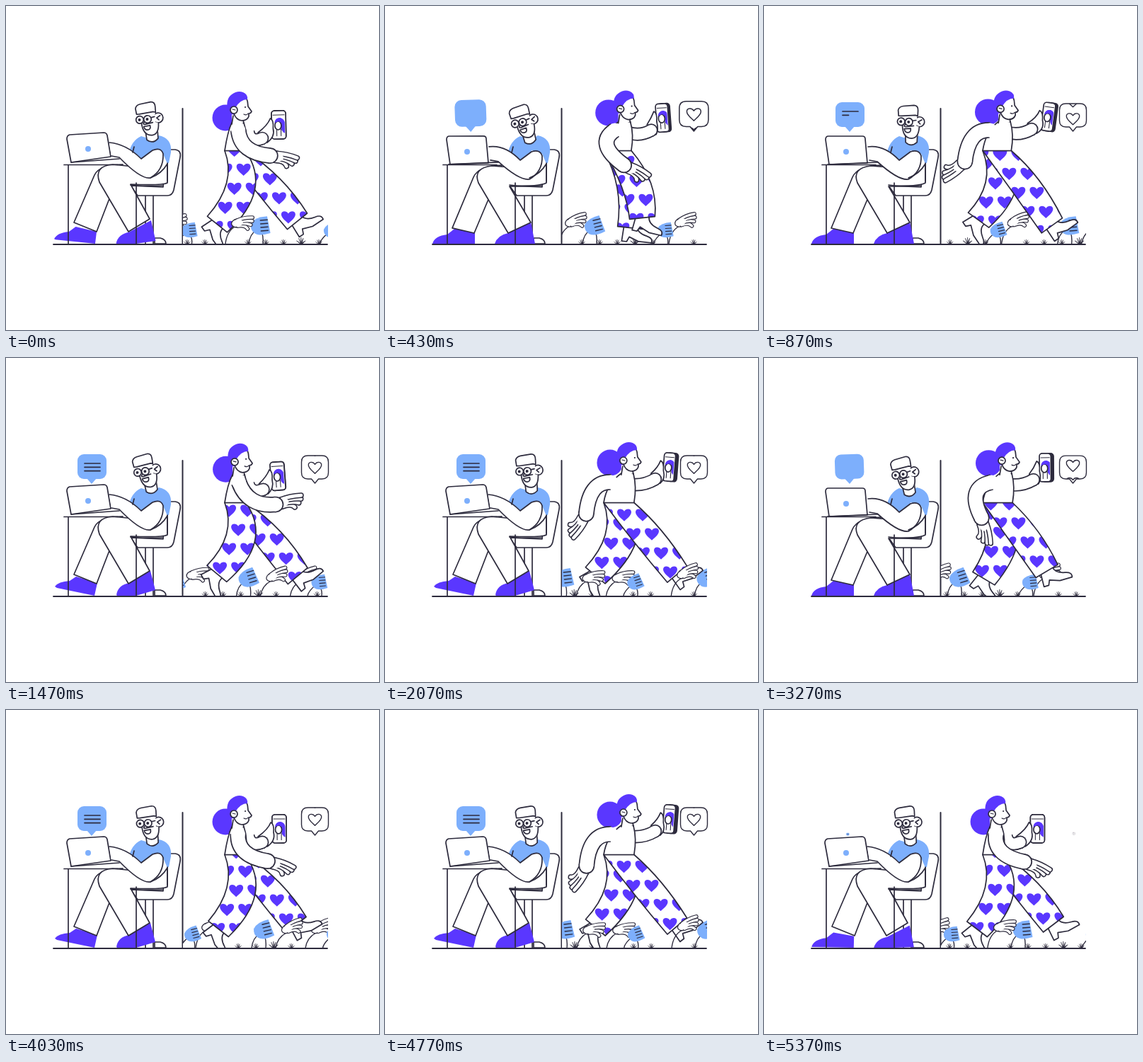
Write an HTML page with a canvas that moves like this. It is 527 px wide and 458 px high and loops after 5410 ms.

```html
<!DOCTYPE html>
<html lang="en">
<head>
<meta charset="utf-8">
<title>Desk and walk</title>
<style>
html, body { margin: 0; width: 100%; height: 100%; overflow: hidden; background: #fff; }
canvas { display: block; }
</style>
</head>
<body>
<canvas id="stage" width="527" height="458"></canvas>
<script>
const g = document.getElementById('stage').getContext('2d');
const INK = '#2d2b3d', PURPLE = '#5a37ff', BLUE = '#7daffc', WHITE = '#fff';
const LOOP = 5410, SCENE = LOOP / 2, WALK = LOOP / 4;
const LINE = 1.7, FLOOR = 337, TILE = 402, WAIST = 204.5;
const rad = d => d * Math.PI / 180;
const lerp = (a, b, k) => a + (b - a) * k;
const clamp = x => Math.max(0, Math.min(1, x));
const ramp = (t, a, b) => { const k = clamp((t - a) / (b - a)); return k * k * (3 - 2 * k); };
// One swing per step cycle; lag is where it peaks
const wave = (u, lag = 0) => Math.cos(2 * Math.PI * (u - lag));

function draw(path, fill, stroke = INK, width = LINE) {
  const p = typeof path === 'string' ? new Path2D(path) : path;
  if (fill) { g.fillStyle = fill; g.fill(p); }
  if (stroke) { g.strokeStyle = stroke; g.lineWidth = width; g.stroke(p); }
}
function disc(x, y, rx, fill, stroke, ry = rx) {
  const p = new Path2D();
  p.ellipse(x, y, rx, ry, 0, 0, 7);
  draw(p, fill, stroke);
}
function box(x, y, w, h, r, fill, stroke) {
  const p = new Path2D();
  p.roundRect(x, y, w, h, r);
  draw(p, fill, stroke);
}
function local(x, y, deg, scale, fn) {
  g.save();
  g.translate(x, y);
  g.rotate(rad(deg));
  g.scale(scale, scale);
  fn();
  g.restore();
}
function mixPath(a, b, k) {
  const end = b.match(/-?[\d.]+/g);
  let i = 0;
  return a.replace(/-?[\d.]+/g, v => lerp(+v, +end[i++], k).toFixed(2));
}

// Sleeve: open at the start, rounded at the end
function tube(sx, sy, cx, cy, ex, ey, w) {
  const p = new Path2D(`M${sx},${sy}Q${cx},${cy} ${ex},${ey}`);
  g.lineCap = 'butt';
  for (const [color, d] of [[INK, LINE], [WHITE, -LINE]]) {
    disc(ex, ey, (w + d) / 2, color, null);
    draw(p, null, color, w + d);
  }
  g.lineCap = 'round';
  disc(sx, sy, w / 2 - .5, WHITE, null);
}
function hand(spread = 1) {
  disc(9, 0, 12, WHITE, INK, 8);
  for (let i = 3; i >= 0; i--) {
    const y = i * 3.5 - 5;
    const p = `M8,${y}Q22,${y * spread - 2} ${38 - i * i * 1.4},${(i * 4.8 - 4) * spread}`;
    draw(p, null, INK, 7.6);
    draw(p, null, WHITE, 4.6);
  }
  disc(9, 0, 10, WHITE, null, 6.5);
}
const HEART = 'M0,9C-4,5 -10,1 -10,-4C-10,-9 -3,-10 0,-5C3,-10 10,-9 10,-4C10,1 4,5 0,9Z';

// ---------- left room ----------
function manHead(x, y, turn) {
  local(x, y, turn, 1, () => {
    draw('M-5,18L-4,29Q4,36 12,28L12,10Z', WHITE);
    disc(14, -1, 7, WHITE, INK);
    draw('M17,-4L12,-1L15,2', null);
    draw('M-12,-9L-10,8Q-7,22 4,24Q15,23 14,6L10,5L10,-11Z', WHITE, null);
    draw('M-10,4Q-9,23 4,23Q14,22 14,6', null);
    draw('M-16,-8L-17,-16Q-16,-21 -10,-22L5,-24Q11,-24 11,-17L11,-9L8,-10L-12,-8Z', WHITE);
    for (const cx of [-12, -1]) {
      disc(cx, 0, 5.3, WHITE, INK);
      disc(cx - .5, 0, 2, INK, null);
    }
    draw('M4,-2L9,-3M-6,4Q-9,7 -5,7L6,5', null);
    draw('M-7,10L2,9Q3,15 -2,15Q-6,15 -7,10Z', WHITE);
  });
}

function man(t) {
  const lean = ramp(t, 100, 450) - ramp(t, 950, 1250);
  const sinceTap = Math.abs(t + 65 - SCENE * Math.round((t + 65) / SCENE));
  const tap = sinceTap < 130 ? Math.cos(Math.PI * sinceTap / 260) ** 2 : 0;
  const foot = Math.max(lean, tap);
  // chair
  draw('M197,268V337M208,268V337', null);
  draw('M210,336V328H218Q226,330 226,336Z', WHITE);
  draw('M226,203H239Q248,204 246,214L237,260Q235,268 228,268H186L176,254L222,256Z', WHITE);
  // rear leg and shoe
  draw(mixPath('M69,323Q74,316 90,315L99,309L129,318L125,336L72,325Z',
    'M67,336Q70,325 88,323L98,315L127,320L127,336L68,336Z', foot), PURPLE, null);
  draw(mixPath('M165,224Q132,224 125,239L96,306L128,319L150,262Z',
    'M165,225Q132,226 125,242L95,314L126,321L150,264Z', lean), WHITE);
  // front shoe and leg
  draw(mixPath('M156,335Q158,321 174,318L204,301L211,328L184,336L157,336Z',
    'M155,336Q159,324 174,321L206,305L212,336L184,336L156,336Z', foot), PURPLE, null);
  draw(mixPath('M228,222V250Q220,254 176,252L203,301L173,319L132,249Q124,226 151,224L190,228Z',
    'M228,223V250Q220,255 176,255L206,306L174,321L132,250Q124,229 151,226L190,229Z', lean), WHITE);
  draw('M176,253Q188,255 221,254', null);
  // shirt
  draw('M173,210Q177,190 191,184Q206,190 216,183Q235,187 233,207L230,222L188,226Z', BLUE, null);
  const u = t / WALK;
  manHead(201 - 6 * wave(u, .25), 160 + 4 * lean, -4 - 9 * wave(u, .25));
  // laptop
  draw(mixPath('M90,182L138,179Q142,179 143,183L148,213L92,221L86,188Q86,183 90,182Z',
    'M91,184L139,184Q143,184 143,188L146,222L92,224L87,189Q87,184 91,184Z', lean), WHITE);
  disc(116, lerp(202, 206, lean), 4, BLUE, null);
  draw(mixPath('M92,221L160,216', 'M90,224L160,221', lean), null);
  // arm
  const arm = mixPath('M146,193Q170,195 191,216L207,204Q219,199 222,209Q223,232 204,243Q190,245 160,214L149,212',
    'M147,199Q170,196 191,218L207,206Q219,202 222,212Q223,234 204,245Q190,247 160,220L149,218', lean);
  draw('M207,204L222,209L228,223Q216,243 202,243Z', WHITE, null);
  draw(arm, WHITE);
  draw('M181,199L179,207M228,222V248M228,223Q220,237 204,243', null);
  // desk
  draw('M82,224.5H158M88,225V337M184,250V337', null);
  draw('M249.5,145V337', null, INK, 2);
}

// ---------- speech bubbles ----------
function bubbleScale(t) {
  if (t > 2300) return 1 - .9 * ramp(t, 2430, 2665) - .1 * ramp(t, 2666, 2690);
  const k = clamp((t - 330) / 330);
  return k ? 1 - Math.exp(-5 * k) * Math.cos(7 * k) * (1 - k) : 0;
}
function bubbles(t) {
  const s = bubbleScale(t);
  if (s < .005) return;
  const tilt = -2 * (1 - ramp(t, 560, 700));
  local(lerp(118, 121, s), 178, tilt, s, () => {
    box(-20, -42, 41, 35, 9, BLUE, null);
    draw('M-7,-8L0,0L7,-8Z', BLUE, null);
    for (let i = 0; i < 3; i++) {
      const k = ramp(t, 720 + i * 100, 840 + i * 100);
      if (k) draw(`M-10,${-29 + i * 5.3}h${22 * k}`, null);
    }
  });
  local(lerp(438, 436.5, s), 177, 0, s, () => {
    const shape = new Path2D('M-10,-39H10Q19,-39 19,-30V-15Q19,-6 10,-6H5L0,0L-5,-6H-10Q-19,-6 -19,-15V-30Q-19,-39 -10,-39Z');
    draw(shape, WHITE, INK, 1.4);
    g.clip(shape);
    const rise = 25 * ramp(t, 440, 1030);
    for (const y of [-22, 3]) local(0, y - rise, 0, .92, () => draw(HEART, null, INK, 1.5));
  });
}

// ---------- plants ----------
function scrolled(x, shift, fn) {
  const px = ((x - shift - 200) % TILE + TILE) % TILE + 200;
  if (px < 490) fn(px);
}
function blueLeaves(shift, u) {
  for (let i = 0; i < 4; i++) scrolled(360 + i * TILE / 4, shift, x => {
    const small = i % 2, y = 311 + 6 * small;
    draw(`M${x - 17},${FLOOR}Q${x - 16},${y + 12} ${x - 4},${y + 3}Q${x + 5},${y + 8} ${x + 3},${FLOOR}`, WHITE, INK, 1.4);
    local(x, y, -11 + 7 * wave(u, i / 3), 1 - .18 * small, () => {
      draw('M10,-13L13,11Q-3,15 -10,9Q-16,3 -13,-5Q-7,-13 10,-13Z', BLUE, null);
      for (let k = 0; k < 4; k++) draw(`M0,${-8 + k * 5}h10`, null, INK, 1.4);
    });
  });
}
function handLeaves(spots, shift, u) {
  spots.forEach((spot, i) => scrolled(spot, shift, x => {
    const y = 306 + 4 * i;
    draw(`M${x - 20},${FLOOR}Q${x - 18},${y + 12} ${x - 5},${y + 5}`, null, INK, 1.4);
    local(x - 9, y + 2, -18 + 8 * wave(u, i / 2), .75, () => hand(1.35));
  }));
}
function grass(shift) {
  // tufts stand in groups of five
  for (let i = 0; i < 12; i++) scrolled(342 + 25 * i + 33 * Math.floor(i / 5), shift, x =>
    local(x, FLOOR, 0, i % 5 === 3 ? 1 : .72, () => {
      for (let k = -2; k <= 2; k++) {
        const dx = k * 3.2, h = 10 - k * k * 1.2;
        draw(`M-1,0Q${dx * .3},${-h * .6} ${dx},${-h}Q${dx * .6},${-h * .4} 1,0`, INK, INK, .5);
      }
    }));
}

// ---------- walker ----------
function leg(phase, right) {
  const u = phase % 1, c = wave(u, .55);
  const reach = c * (1.25 - .25 * c * c);
  const x = 355 + 58 * reach, y = 306.5 + 7 * wave(u, .8);
  const hem = rad(-40 * reach), dx = 18 * Math.cos(hem), dy = 18 * Math.sin(hem);
  local(x, y, 10 - 50 * wave(u, .58), 1, () =>
    draw('M-9,-4L-10,20L-3,20L0,13L14,18L32,18Q34,11 24,9Q10,6 9,-4Z', WHITE));
  const p = new Path2D(`M309,${WAIST}Q${339 + 13 * reach},${256 + 6 * reach} ${x - dx},${y - dy}` +
    `L${x + dx},${y + dy}Q${385 + 8 * reach},${250 - 10 * reach} ${right},${WAIST}Z`);
  draw(p, WHITE, null);
  g.save();
  g.clip(p);
  // the print slides five rows down the cloth per cycle
  const px = 338 + 13 * u + 26 * wave(u, .65), py = 258 + 135 * u;
  for (let j = -9; j < 4; j++)
    for (let i = -5; i < 6; i++)
      local(px + i * 26 + (j & 1) * 13, py + j * 27, 0, 1, () => draw(HEART, PURPLE, null));
  g.restore();
  draw(p, null);
}

function phone(x, y, angle, depth) {
  local(x, y, angle, 1, () => {
    const w = 20 - depth, left = -w / 2;
    box(left + depth, -20, w, 40, 4, INK, INK);
    box(left, -20, w, 40, 4, WHITE, INK);
    g.save();
    g.beginPath();
    g.rect(left + 1.5, -14, w - 3, 30);
    g.clip();
    draw('M-6,-1Q-5,-10 2,-10Q9,-9 10,3L9,12Q3,10 3,2Z', PURPLE, null);
    disc(-1, 1, 4.5, WHITE, INK, 6);
    draw('M-6,-3Q-5,-10 2,-10Q5,-9 5,-2L0,-5Z', PURPLE, null);
    draw('M-3,7V16M3,6V16', null, INK, 1.1);
    g.restore();
    draw(`M${left + 2},-14h${w - 4}`, null, INK, 1);
  });
}

function womanHead(x, y) {
  local(x, y, 0, 1, () => {
    draw('M-12,10L-12,24Q-3,27 4,22L4,14Z', WHITE, null);
    draw('M-10,12L-12,24M4,18L5,23', null);
    draw('M-10,-8L8,-15Q11,-8 11,-1L16,6Q15,9 12,9L12,13Q10,19 2,19Q-6,18 -9,9Z', WHITE);
    draw('M-18,6Q-21,-12 -12,-18Q-4,-24 4,-21Q11,-18 10,-11Q0,-11 -7,1L-11,4Z', PURPLE, null);
    disc(-9, 4, 5, WHITE, INK);
    draw('M-11,3L-7,4', null, INK, 1.2);
    disc(7, 0, 1.1, INK, null);
    draw('M5,10Q9,12 11,9', null, INK, 1.2);
  });
}

function walker(u) {
  const c = wave(u), right = 345 - 7 * c;
  const hx = 338.5 - 7.5 * c, hy = 142 + c;
  disc(314 - 4 * c, 153 + 5 * c, 18.5, PURPLE, null);
  leg(u + .5, right);
  leg(u, right);
  // arm with the phone
  const wx = 372 - 10 * c, wy = 179 + 8 * c;
  const px = 393 - 9 * wave(u, .09), py = 161 + 7 * c;
  phone(px, py, 1 - 7 * wave(u, .2), 2 - 2 * c);
  const tx = px - 8, ty = py + 9;
  draw(`M${wx - 6},${wy - 8}Q${tx - 8},${ty - 8} ${tx - 4},${ty - 18}Q${tx + 1},${ty - 16} ${tx},${ty - 4}Q${tx + 3},${ty + 8} ${wx + 7},${wy + 6}Z`, WHITE);
  tube(342, 178, 355 - 9 * c, 188 + 6 * c, wx, wy, 17);
  draw(`M${hx - 12},${hy + 22}Q313,178 309,${WAIST}H${right}Q${right + 4},182 ${hx + 5},${hy + 22}Z`, WHITE);
  womanHead(hx, hy);
  // free arm, the hand trailing a little
  const s = wave(u, .09);
  const ax = 331 + 50 * s, ay = 226 - 13 * s * s - 6 * s;
  local(ax, ay, 62 - 80 * wave(u, .14), 1, hand);
  tube(324 + 5 * s, 175.5, 292 + 26 * s + 24 * s * s, 192 + 19 * s, ax, ay, 21);
}

function frame() {
  const now = performance.now() % LOOP, t = now % SCENE, u = now % WALK / WALK;
  const shift = t / SCENE * TILE;
  g.clearRect(0, 0, 527, 458);
  g.lineCap = g.lineJoin = 'round';
  man(t);
  g.save();
  g.beginPath();
  g.rect(250, 100, 205, FLOOR - 100);
  g.clip();
  handLeaves([485, 640], shift, u);
  blueLeaves(shift, u);
  grass(shift);
  walker(u);
  handLeaves([330, 598], shift, u);
  g.restore();
  bubbles(t);
  draw('M67,337H454', null, INK, 1.8);
  requestAnimationFrame(frame);
}
frame();
</script>
</body>
</html>
```
